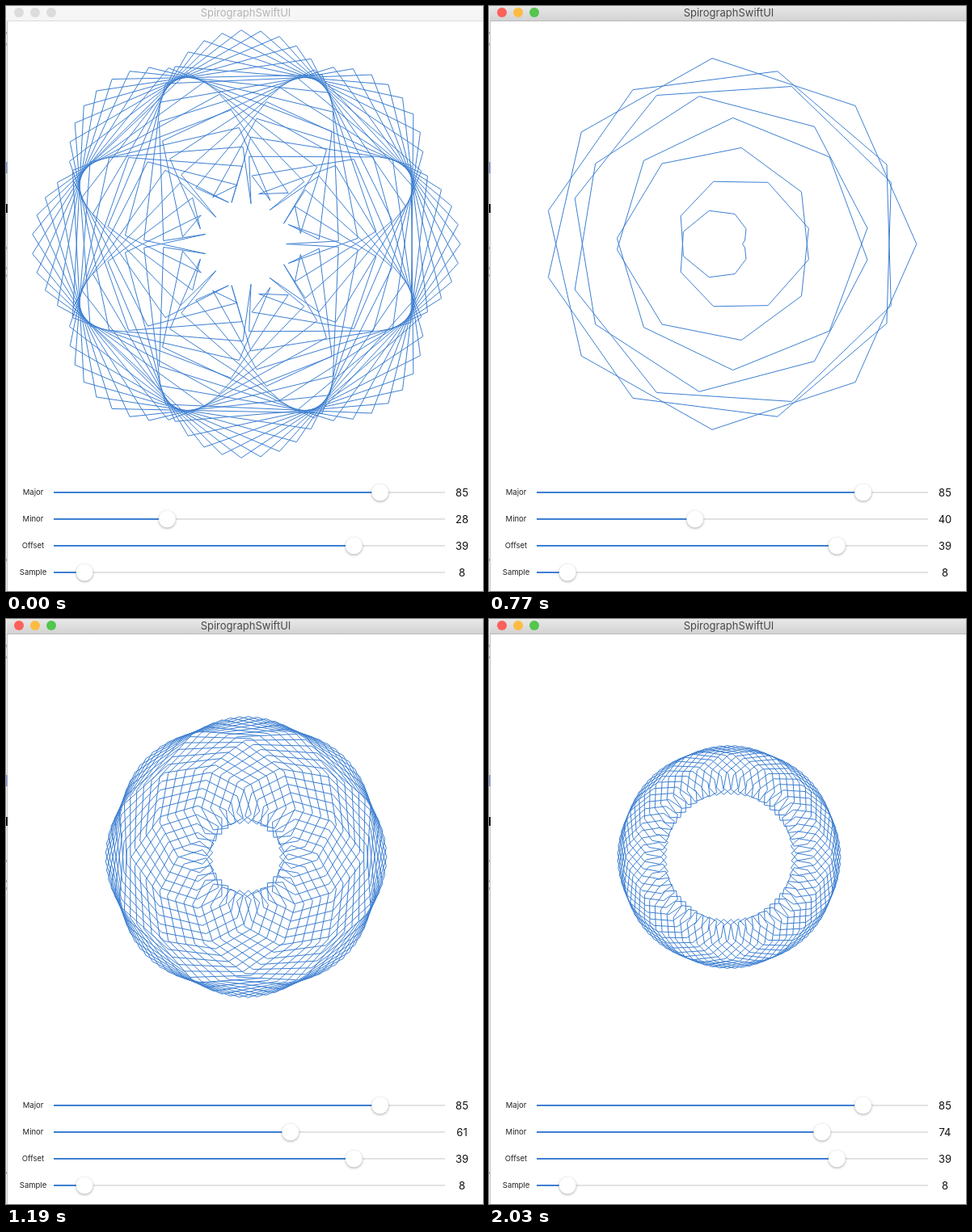
Write an HTML page with a canvas that moves like this. It is 590 px wide and 724 px high and loops after 2.1 s.

```html
<!DOCTYPE html>
<html lang="en">
<head>
<meta charset="utf-8">
<title>Spirograph</title>
<style>
html, body { margin: 0; width: 100%; height: 100%; overflow: hidden; background: #fff; }
canvas { display: block; }
</style>
</head>
<body>
<canvas id="stage" width="590" height="724"></canvas>
<script>
const ctx = document.getElementById('stage').getContext('2d');
const LOOP = 2100, STEP = 70, ACTIVE_FROM = 490;
const MAJOR = 85, OFFSET = 39, SAMPLE = 8;
const BLUE = '#3d7fd2';
// Minor radius while the slider is dragged: [ms, value]
const DRAG = [[0, 28], [420, 28], [770, 40], [1050, 50], [1330, 71], [1680, 78], [2030, 74]];

const gcd = (a, b) => b ? gcd(b, a % b) : a;

function minorAt(t) {
  const i = Math.max(1, DRAG.findIndex(([time]) => time >= t));
  const [t0, v0] = DRAG[i - 1], [t1, v1] = DRAG[i];
  return Math.round(v0 + (v1 - v0) * (t - t0) / (t1 - t0));
}

function rect(x, y, w, h, color) {
  ctx.fillStyle = color;
  ctx.fillRect(x, y, w, h);
}

function disc(x, y, r, color) {
  ctx.fillStyle = color;
  ctx.beginPath();
  ctx.arc(x, y, r, 0, 2 * Math.PI);
  ctx.fill();
}

function label(text, x, y, size, color) {
  ctx.font = `${size}px Inter, Roboto, sans-serif`;
  ctx.fillStyle = color;
  ctx.fillText(text, x, y);
}

function titleBar(active) {
  const bar = ctx.createLinearGradient(0, 0, 0, 18);
  bar.addColorStop(0, active ? '#e8e8e8' : '#f7f7f7');
  bar.addColorStop(1, active ? '#d3d3d3' : '#f5f5f5');
  rect(1, 0, 589, 18, bar);
  rect(1, 18, 589, 1, active ? '#b9b9b9' : '#dcdcdc');
  const lights = active ? ['#fc605b', '#fdbc40', '#54c54f'] : Array(3).fill('#dcdcdc');
  lights.forEach((color, i) => disc(16 + 20 * i, 8, 6, color));
  label('SpirographSwiftUI', 296.5, 13, 13, active ? '#4a4a4a' : '#b4b4b4');
}

// Sliver of the window behind, along the left edge
function backdrop() {
  rect(0, 0, 1, 724, '#f2f2f2');
  rect(1, 0, 1, 724, '#c4c4c4');
  rect(0, 193, 2, 14, '#8f9fc8');
  rect(0, 245, 2, 11, '#111');
  for (const y of [32, 46, 298, 323, 332, 684]) rect(0, y, 1, 3, '#aaa');
}

function spirograph(minor) {
  const arm = MAJOR - minor, scale = 2.76;
  const count = SAMPLE * minor / gcd(MAJOR, minor);
  ctx.beginPath();
  for (let i = 0; i < count; i++) {
    const a = 2 * Math.PI * i / SAMPLE, b = a * arm / minor;
    ctx.lineTo(297 + scale * (arm * Math.cos(a) + OFFSET * Math.cos(b)),
               294.5 - scale * (arm * Math.sin(a) + OFFSET * Math.sin(b)));
  }
  ctx.closePath();
  ctx.strokeStyle = BLUE;
  ctx.lineWidth = 1;
  ctx.stroke();
}

function slider(name, value, fraction, y) {
  const x = 70 + 462 * fraction;
  rect(59, y - 1, 484, 2, '#e2e2e2');
  rect(59, y - 1, x - 59, 2, BLUE);
  ctx.save();
  ctx.shadowColor = 'rgba(0,0,0,.35)';
  ctx.shadowBlur = 3;
  ctx.shadowOffsetY = 1;
  disc(x, y, 10.5, '#fff');
  ctx.restore();
  label(name, 33.5, y + 3, 9.5, '#222');
  label(value, 564, y + 5, 13, '#111');
}

function draw(now) {
  const t = Math.floor(now % LOOP / STEP) * STEP;
  const minor = minorAt(t);
  ctx.textAlign = 'center';
  rect(0, 0, 590, 724, '#fff');
  backdrop();
  titleBar(t >= ACTIVE_FROM);
  spirograph(minor);
  slider('Major', MAJOR, MAJOR / 100, 602);
  slider('Minor', minor, minor / 100, 635);
  slider('Offset', OFFSET, OFFSET / 50, 668);
  slider('Sample', SAMPLE, (SAMPLE - 1) / 119, 701);
}

let start;
function frame(now) {
  start ??= now;
  draw(now - start);
  requestAnimationFrame(frame);
}
draw(0);
requestAnimationFrame(frame);
</script>
</body>
</html>
```
